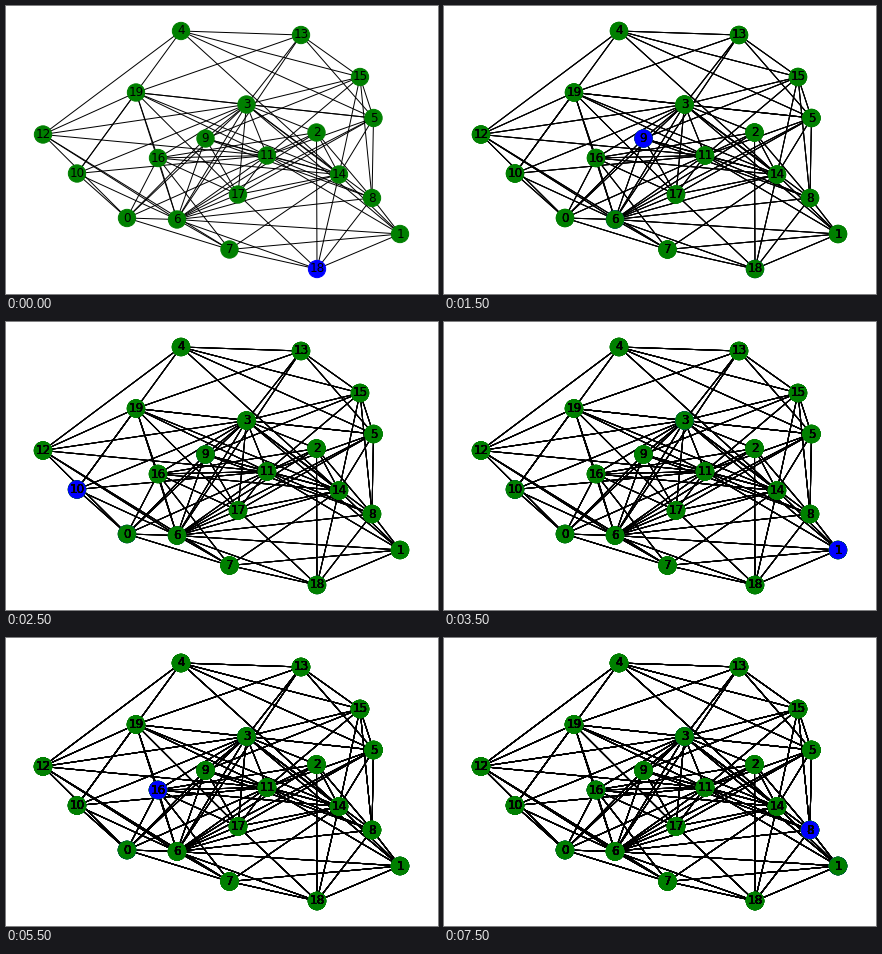
Animation, 432 px wide and 288 px high, one loop 8 s. Source, as a matplotlib script:

```python
from itertools import pairwise
from math import hypot

import matplotlib.pyplot as plt
from matplotlib.animation import FuncAnimation
from matplotlib.collections import LineCollection

W, H, DPI = 432, 288, 72
STEP_MS = 500
HUB_REACH = 227

NODES = [
    (121, 212), (394, 228), (310.5, 126.5), (240.5, 98.5), (175, 25),
    (367.5, 112), (171, 213.5), (223.5, 243.5), (366, 192), (199.5, 132.5),
    (71, 167.5), (261, 149.5), (37, 128.5), (295, 29), (333, 168.5),
    (354, 71), (152, 152), (232, 188.5), (311, 263), (130, 86.5),
]
HUBS = (3, 6, 11)
TRAILS = (
    (12, 4, 13, 15, 5, 8, 1, 18, 7, 0, 12, 19, 13, 5, 4, 15, 14, 5, 17, 14,
     18, 2, 14, 1, 7, 12),
    (0, 10, 4, 14, 7, 16, 19, 6, 16, 14, 9, 15, 8, 18, 17, 19, 14),
    (5, 19, 10, 6, 9, 8, 2, 16, 0, 9, 17, 3, 13, 6, 3, 11, 17, 16),
)
STOPS = (18, 9, 10, 1, 16, 16, 3, 8)


def hub_link(a, b):
    """Hubs link to every node in reach along a slope flatter than 45 degrees."""
    dx, dy = (q - p for p, q in zip(NODES[a], NODES[b]))
    return abs(dy) < abs(dx) and hypot(dx, dy) < HUB_REACH


def build_edges():
    links = [pair for trail in TRAILS for pair in pairwise(trail)]
    links += [(h, n) for h in HUBS for n in range(len(NODES)) if hub_link(h, n)]
    return sorted({tuple(sorted(link)) for link in links})


def build_walk(edges):
    """Join successive stops through a neighbour that both share."""
    near = {n: set() for n in range(len(NODES))}
    for a, b in edges:
        near[a].add(b)
        near[b].add(a)
    walk = [STOPS[0]]
    for a, b in pairwise(STOPS):
        walk += [min(near[a] & near[b]), b]
    return walk


edges = build_edges()
walk = build_walk(edges)
segments = [(NODES[a], NODES[b]) for a, b in edges]
xs, ys = zip(*NODES)

fig = plt.figure(figsize=(W / DPI, H / DPI), dpi=DPI, facecolor="white")
ax = fig.add_axes([0, 0, 1, 1])
ax.set_xlim(0, W)
ax.set_ylim(H, 0)
ax.axis("off")


def make_layer(active):
    """Draw the whole graph once with the active node in blue."""
    colors = ["blue" if n == active else "green" for n in range(len(NODES))]
    lines = LineCollection(segments, colors="black", linewidths=1, zorder=1)
    ax.add_collection(lines, autolim=False)
    dots = ax.scatter(xs, ys, s=300, c=colors, linewidths=1, zorder=2)
    labels = [
        ax.text(x, y, str(n), family="DejaVu Sans", size=12,
                ha="center", va="center", zorder=3)
        for n, (x, y) in enumerate(NODES)
    ]
    return [lines, dots, *labels]


layers = [make_layer(node) for node in walk]


def update(frame):
    # Layers pile up, so smoothed lines and text darken with every step.
    step = max(0, frame - 1)
    for i, layer in enumerate(layers):
        for artist in layer:
            artist.set_visible(i <= step)
    return [artist for layer in layers for artist in layer]


anim = FuncAnimation(fig, update, frames=len(walk) + 1, interval=STEP_MS,
                     repeat=True, repeat_delay=0, blit=False)
plt.show()
```
